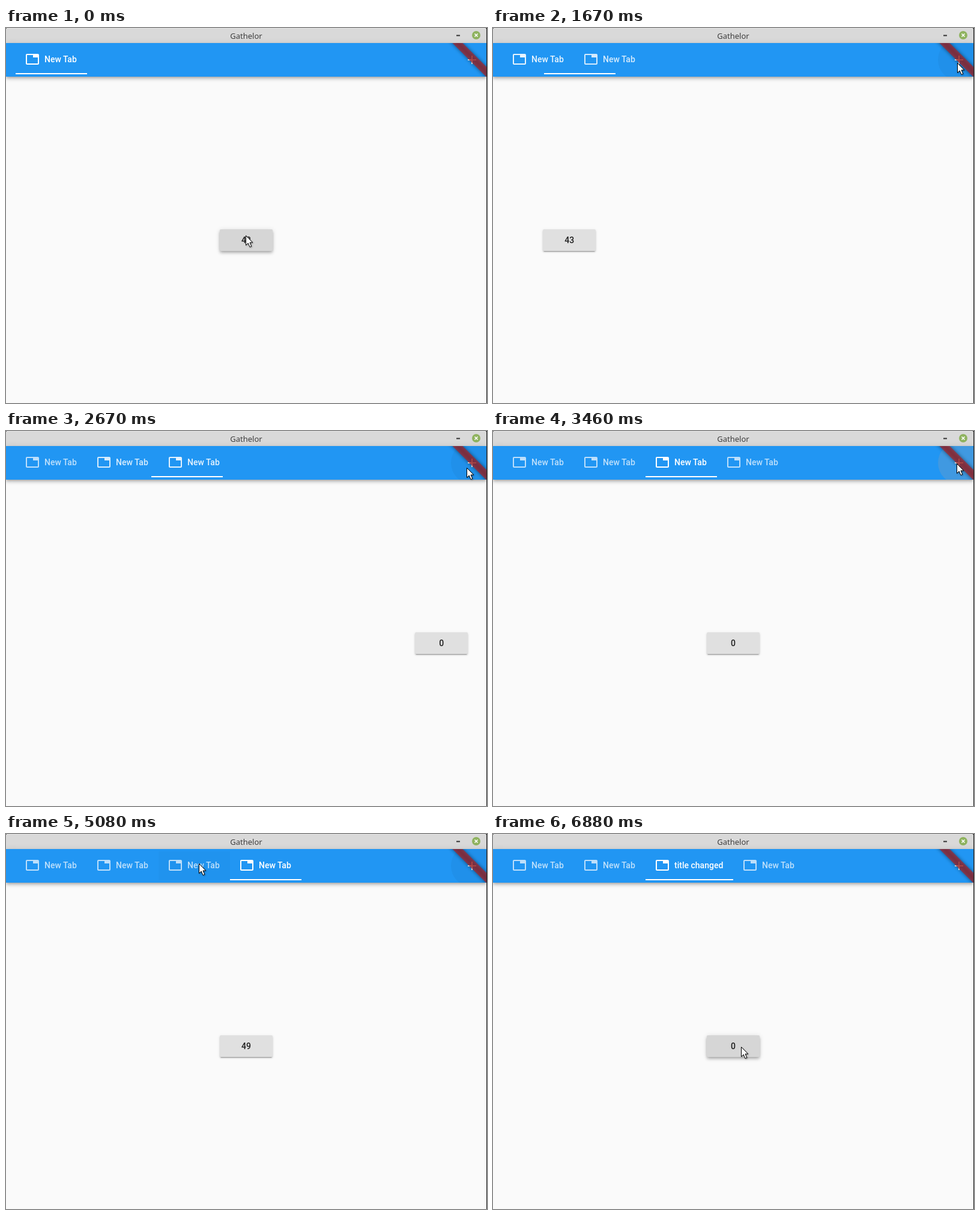
Animation, 801 px wide and 624 px high, one loop 8000 ms. Source, as an HTML page:

```html
<!DOCTYPE html>
<html lang="en">
<head>
<meta charset="utf-8">
<title>Tabs</title>
<style>
  html, body { margin: 0; width: 100%; height: 100%; overflow: hidden; background: #1c1c1c; }
  div, svg { position: absolute; }
  #window { width: 800px; height: 624px; overflow: hidden; background: #fafafa; border-radius: 3px 3px 0 0; }
  #title { width: 800px; height: 25px; background: #d9d9d9; box-shadow: inset 0 1px #e4e4e4;
    font: 500 13px/26px "Noto Sans", "Open Sans", sans-serif; color: #3c3c3c; text-align: center; }
  #bar { top: 25px; width: 800px; height: 56px; overflow: hidden; background: #2196f3;
    box-shadow: 0 2px 4px -1px #0003, 0 4px 5px #00000024, 0 1px 10px #0000001f; }
  .tab { top: 4px; height: 48px; color: #fff; font: 500 14px/46px Roboto, sans-serif; white-space: pre; }
  .tab svg { left: 16px; top: 11px; fill: #fff; }
  .tab span { position: absolute; left: 48px; }
  #indicator { top: 50px; height: 2px; background: #fff; }
  .halo { left: 741px; top: -7px; width: 70px; height: 70px; border-radius: 50%; }
  #banner { left: 720px; top: 0; }
  .button { top: 335px; width: 88px; height: 36px; border-radius: 2px; text-align: center;
    font: 500 14px/36px Roboto, sans-serif; color: #000000de; }
</style>
</head>
<body>
<div id="window">
  <div id="title">Gathelor
    <svg style="left:745px;top:0" width="50" height="25">
      <path d="M5 12.5h6" stroke="#333" stroke-width="2"/>
      <circle cx="38" cy="12" r="7" fill="#8fb35f"/>
      <path d="M35.5 9.5l5 5m0-5l-5 5" stroke="#fff" stroke-width="1.6"/>
    </svg>
  </div>
  <div id="bar">
    <div id="hover" style="left:254px;top:4px;width:119px;height:48px;background:#000"></div>
    <div id="tabs"></div>
    <div id="indicator"></div>
    <div class="halo" id="halo" style="background:#000"></div>
    <div class="halo" id="press" style="background:#bcbcbc"></div>
    <svg id="banner" width="80" height="56">
      <path d="M49 28h14M56 21v14" stroke="#fff" stroke-width="2"/>
      <g transform="translate(80 0) rotate(45)">
        <rect x="-50" y="28" width="100" height="12" style="filter:blur(3px)" fill="#0000007f"/>
        <rect x="-50" y="28" width="100" height="12" fill="#b71c1ca0"/>
      </g>
    </svg>
  </div>
  <div id="pages"></div>
  <svg id="cursor" width="18" height="26" style="overflow:visible">
    <path d="M.5 .5V16.5L4.2 13L7 19.5L9.8 18.3L7 12H11.8Z" fill="#fff" stroke="#000"
      style="filter:drop-shadow(1px 1px 1px #0005)"/>
  </svg>
</div>
<script>
const $ = id => document.getElementById(id);
const LOOP = 8000, SLIDE = 300;
const COUNTS = [43, 0, 0, 49];

// The screen refreshes only at these moments.
const REFRESH = [
  0, 1420, 1480, 1540, 1610, 1670, 1750, 1820, 1890, 1960,
  2380, 2450, 2520, 2590, 2670, 2750, 2830, 2920,
  3290, 3380, 3460, 3540, 3620, 3710, 3790,
  5080, 5170, 5250, 5330, 5420, 5500,
  6670, 6740, 6810, 6880];
const TAB_ADDED = [0, 1540, 2450, 3460];
const RENAMED = 6810;

// Tab switches: [start, direction]
const BAR_MOVES = [[1570, 1], [2484, 1], [3460, 1], [5195, -1]];
const PAGE_MOVES = [[1604, 1], [2567, 1], [3490, 1], [5195, -1]];
const CURSOR = [[0, 399, 345], [1420, 773, 58], [2380, 767, 61], [3290, 772, 54],
  [5080, 321, 49], [6670, 413, 354]];

const clamp = x => Math.min(1, Math.max(0, x));
const mix = (a, b, k) => a + (b - a) * k;
const bezier = (a, b, s) => 3 * a * s * (1 - s) ** 2 + 3 * b * s * s * (1 - s) + s ** 3;

// cubic-bezier(.25, .1, .25, 1)
function ease(x) {
  if (x <= 0 || x >= 1) return clamp(x);
  let low = 0, high = 1;
  for (let i = 0; i < 20; i++) {
    const mid = (low + high) / 2;
    if (bezier(.25, .25, mid) < x) low = mid; else high = mid;
  }
  return bezier(.1, 1, low);
}
const position = (moves, t) =>
  moves.reduce((sum, [start, dir]) => sum + dir * ease((t - start) / SLIDE), 0);
const fade = (t, start, end, ms = 150) => clamp((t - start) / ms) * (1 - clamp((t - end) / ms));

const icon = '<svg width="24" height="24"><path d="M21 3H3c-1.1 0-2 .9-2 2v14c0 1.1.9 2 2 2h18c1.1 0 2-.9 2-2V5c0-1.1-.9-2-2-2zm0 16H3V5h10v4h8v10z"/></svg>';
$('tabs').innerHTML = COUNTS.map(() => `<div class="tab">${icon}<span>New Tab</span></div>`).join('');
$('pages').innerHTML = COUNTS.map(n => `<div class="button">${n}</div>`).join('');
const tabs = [...$('tabs').children], buttons = [...$('pages').children];

function draw(t) {
  const renamed = t >= RENAMED;
  const widths = [119, 119, renamed ? 146 : 119, 119];
  const lefts = [16, 135, 254, 254 + widths[2]];
  const bar = position(BAR_MOVES, t), page = position(PAGE_MOVES, t);

  tabs.forEach((tab, i) => {
    tab.style.display = t >= TAB_ADDED[i] ? '' : 'none';
    tab.style.left = lefts[i] + 'px';
    tab.style.opacity = .7 + .3 * clamp(1 - Math.abs(page - i));
  });
  tabs[2].lastChild.textContent = renamed ? 'title changed' : 'New Tab';

  const from = Math.min(2, Math.floor(bar)), k = bar - from;
  $('indicator').style.left = mix(lefts[from], lefts[from + 1], k) + 'px';
  $('indicator').style.width = mix(widths[from], widths[from + 1], k) + 'px';

  const over = t < 1420 || t >= 6670, raised = t < 1420 || t >= 6740;
  buttons.forEach((button, i) => {
    button.style.left = 356 + (i - page) * 800 + 'px';
    button.style.background = over ? '#d6d6d6' : '#e0e0e0';
    button.style.boxShadow = raised
      ? '0 2px 4px -1px #0003, 0 4px 5px #00000024, 0 1px 8px #0000001f'
      : '0 3px 1px -2px #0003, 0 2px 2px #00000024, 0 1px 4px #0000001f';
  });

  $('halo').style.opacity = .04 * fade(t, 1400, 5080);
  $('press').style.opacity = .2 * Math.max(
    fade(t, 1440, 1540, 80), fade(t, 2400, 2500, 80), fade(t, 3330, 3470, 80));
  $('hover').style.opacity = .04 * fade(t, 5010, 6640);

  const [, x, y] = CURSOR.filter(c => c[0] <= t).pop();
  $('cursor').style.left = x + 'px';
  $('cursor').style.top = y + 'px';
}

const origin = performance.now();
function tick() {
  const now = (performance.now() - origin) % LOOP;
  draw(REFRESH.filter(s => s <= now).pop());
  requestAnimationFrame(tick);
}
tick();
</script>
</body>
</html>
```
